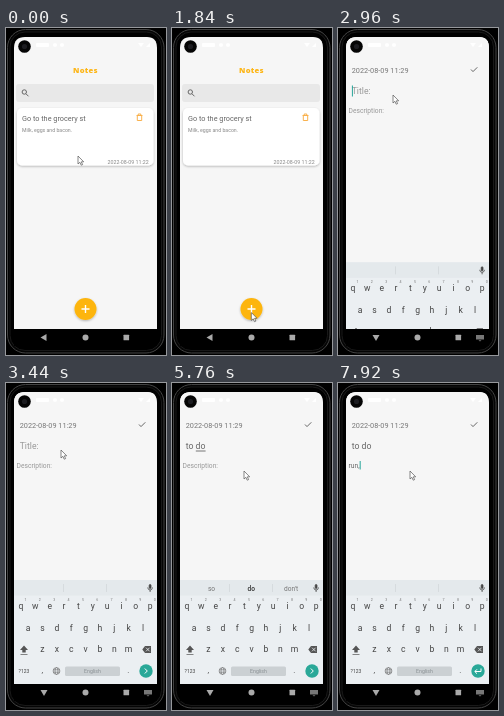
An HTML page that plays this animation: 160 by 327 pixels, repeating every 8000 ms.

```html
<!DOCTYPE html>
<html lang="en">
<head>
<meta charset="utf-8">
<title>Notes app</title>
<style>
  html, body { margin: 0; width: 100%; height: 100%; overflow: hidden; background: #000; }
  svg { display: block; width: 160px; height: 327px; }
  text { font-family: Roboto, sans-serif; fill: #666; white-space: pre; }
  .mid { text-anchor: middle; }
  .line { fill: none; stroke: #666; stroke-width: 1; }
  .hint { fill: #999; }
</style>
</head>
<body>
<svg viewBox="0 0 160 327">
  <defs>
    <clipPath id="screenClip"><path d="M8 301V20Q8 9 19 9H141Q151 9 151 20V301Z"/></clipPath>
    <filter id="shadow" x="-20%" y="-20%" width="140%" height="150%">
      <feDropShadow dx="0" dy="1" stdDeviation="1" flood-opacity=".28"/>
    </filter>
  </defs>

  <rect width="160" height="327"/>
  <rect x="1.5" y="1.5" width="156.5" height="323.5" rx="18" fill="#050505" stroke="#444" stroke-width="1"/>
  <rect x="4" y="4" width="151.5" height="318.5" rx="15" fill="#000" stroke="#191919" stroke-width="1"/>

  <g clip-path="url(#screenClip)">
    <rect x="8" y="9" width="143" height="292" fill="#f6f6f6"/>

    <g id="list">
      <text class="mid" x="79.5" y="45" style="font:800 7.6px 'Open Sans',sans-serif;fill:#fdb515;letter-spacing:.3px">Notes</text>
      <rect x="10" y="56" width="138" height="18" rx="3" fill="#e8e8e8"/>
      <g class="line"><circle cx="18.3" cy="64" r="2.2"/><path d="M20 65.8L22.5 68.3"/></g>
      <rect x="11" y="80" width="136.5" height="57.5" rx="5" fill="#fff" filter="url(#shadow)"/>
      <text x="16" y="93" font-size="7.3">Go to the grocery st</text>
      <text x="16" y="104" font-size="5.2" style="fill:#888">Milk, eggs and bacon.</text>
      <text x="101.5" y="135.5" font-size="5.3" style="fill:#888">2022-08-09 11:22</text>
      <path d="M130.5 87.5H136.5M132.2 87.3V86H134.8V87.3M131.3 88V92.5H135.7V88" fill="none" stroke="#f9aa3c" stroke-width=".9"/>
      <circle cx="79.5" cy="281" r="11" fill="#fdb50d" filter="url(#shadow)"/>
      <circle id="ripple" cx="79.5" cy="281" fill="#fff"/>
      <path d="M75.5 281H83.5M79.5 277V285" stroke="#fff" stroke-width="1.4"/>
    </g>

    <g id="editor">
      <rect x="8" y="9" width="143" height="292" fill="#f6f6f6"/>
      <text x="13.7" y="44.5" font-size="7.3" style="fill:#777">2022-08-09 11:29</text>
      <path class="line" d="M133 41.5L135 43.6L139.3 39.3"/>
      <text id="title" x="13.7" y="66" font-size="8.7"></text>
      <path id="underline" d="M23.8 68H33.6" stroke="#555" stroke-width=".8"/>
      <text id="body" x="10.5" y="85" font-size="6.7"></text>
      <rect id="caret" width="1" fill="#26a69a"/>
    </g>

    <g fill="#fff">
      <rect x="30" y="15" width="13" height="4" rx="1"/>
      <circle cx="49" cy="17" r="2"/><circle cx="56" cy="17" r="2"/>
      <path d="M132 15H138L135 19ZM140 19L144 15V19Z"/>
    </g>

    <g id="keyboard">
      <rect x="8" y="197" width="143" height="104" fill="#ebeff2"/>
      <rect x="8" y="197" width="143" height="15.5" fill="#e4e9ec"/>
      <path d="M57.5 201V209M100.5 201V209" stroke="#d0d6d9" stroke-width=".7"/>
      <g id="words"></g>
      <g fill="none" stroke="#444" stroke-width=".8">
        <rect x="143.2" y="201.5" width="1.8" height="4" rx=".9" fill="#444"/>
        <path d="M141.7 204.5Q142 207 144.1 207T146.5 204.5M144.1 207V209"/>
      </g>
      <g id="keys"></g>
      <path d="M18 262.5L14 267H16.3V269.5H19.7V267H22Z" fill="#555"/>
      <path d="M14.5 271.5H21.5" stroke="#555" stroke-width=".7"/>
      <path d="M136.3 266.5L139 263H145V270H139Z" fill="#555"/>
      <path d="M140 264.7L143.6 268.3M143.6 264.7L140 268.3" stroke="#ebeff2" stroke-width=".8"/>
      <g class="line" style="stroke-width:.6">
        <circle cx="50.5" cy="288" r="3.4"/><ellipse cx="50.5" cy="288" rx="1.5" ry="3.4"/><path d="M47.2 286.8H53.8M47.2 289.2H53.8"/>
      </g>
      <rect x="59" y="283.5" width="55" height="9.5" rx="1.5" fill="#cbd0d3"/>
      <text class="mid" x="86.5" y="290" font-size="5.2" style="fill:#8a9094">English</text>
      <circle cx="140" cy="288" r="6.7" fill="#2aa898"/>
      <path id="enter" fill="none" stroke="#fff" stroke-width="1"/>
    </g>
  </g>

  <rect x="8" y="301" width="143" height="17" fill="#000"/>
  <g fill="#aaa">
    <path id="back" d="M34.5 309.5L40.5 306V313Z"/>
    <circle cx="79.5" cy="309.5" r="3"/>
    <rect x="117.5" y="306.7" width="5.6" height="5.6" rx=".5"/>
    <path id="switcher" d="M138 307H146V311.5H138ZM140.5 312.2H143.5L142 313.6Z" fill="#777"/>
  </g>
  <circle cx="18.5" cy="18.5" r="6.3" fill="#050505"/>
  <circle cx="18.5" cy="18.5" r="2.6" fill="#1c1c20"/>
  <path id="pointer" d="M0 0V8L1.9 6.3L3.2 9.2L4.6 8.6L3.3 5.8H5.7Z" fill="#fff" stroke="#555" stroke-width=".7"/>
</svg>

<script>
const LOOP = 8000, OPEN = 1840, FOCUS_TITLE = 2880, FOCUS_BODY = 6000;
const $ = id => document.getElementById(id);
const clamp = v => Math.min(1, Math.max(0, v));
const progress = (t, start, length) => clamp((t - start) / length);
const smooth = p => p * p * (3 - 2 * p);
const show = (id, on) => $(id).setAttribute("visibility", on ? "visible" : "hidden");
const label = (x, y, size, text, color = "#444") =>
  `<text class="mid" x="${x}" y="${y}" font-size="${size}" style="fill:${color}">${text}</text>`;

// time, x, y of the pointer tip
const path = [
  [0, 72, 128], [240, 72, 136], [880, 78, 284], [1280, 78.5, 288], [1760, 78.5, 288],
  [2080, 83.5, 266], [2720, 55, 67], [5040, 55, 67], [5760, 72, 88], [LOOP, 72, 88]
];
// time, text, suggestions
const titleTyping = [
  [FOCUS_TITLE, ""], [3680, "t", ["the", "to", "that"]], [3920, "to", ["too", "to", "today"]],
  [4240, "to "], [4560, "to d", ["do", "d", "day"]], [4800, "to do", ["so", "do", "don't"]]
];
const bodyTyping = [
  [FOCUS_BODY, ""], [6960, "r", ["are", "r", "right"]], [7200, "ru", ["run", "ru", "rule"]],
  [7440, "run", ["fun", "run", "running"]], [7760, "run,"]
];

[["qwertyuiop", 15, 226], ["asdfghjkl", 22.2, 247.5], ["zxcvbnm", 36.5, 269]].forEach(([row, x, y], r) => {
  [...row].forEach((key, i) => {
    const cx = x + i * 14.35;
    $("keys").innerHTML += label(cx, y, 8.6, key);
    if (!r) $("keys").innerHTML += label(cx + 4.5, 218, 3.6, (i + 1) % 10, "#777");
  });
});
$("keys").innerHTML += label(18, 290, 5, "?123") + label(36.3, 290, 8, ",") + label(122.3, 290, 8, ".");

function pointerAt(t) {
  const i = Math.max(1, path.findIndex(point => point[0] >= t));
  const [t0, x0, y0] = path[i - 1], [t1, x1, y1] = path[i];
  const p = smooth(progress(t, t0, t1 - t0));
  return [x0 + (x1 - x0) * p, y0 + (y1 - y0) * p];
}

const typedAt = (steps, t) => steps.filter(step => step[0] <= t).pop() || [0, ""];

function setField(id, text, hint) {
  $(id).textContent = text || hint;
  $(id).setAttribute("class", text ? "" : "hint");
}

function draw(t) {
  const inBody = t >= FOCUS_BODY, keyboardOpen = t >= FOCUS_TITLE;
  const title = typedAt(titleTyping, t), body = typedAt(bodyTyping, t);
  const [editTime, text, words = []] = inBody ? body : title;

  $("pointer").setAttribute("transform", `translate(${pointerAt(t)})`);
  const tap = progress(t, 1440, 360);
  $("ripple").setAttribute("r", 11 * tap);
  $("ripple").setAttribute("opacity", .35 * Math.sin(Math.PI * tap));
  $("editor").setAttribute("opacity", progress(t, OPEN, 200));

  setField("title", title[1], "Title:");
  setField("body", body[1], "Description:");
  show("underline", title[1] === "to do" && !inBody);

  const field = $(inBody ? "body" : "title");
  const width = text ? field.getSubStringLength(0, text.length) : 0;
  const caret = $("caret");
  caret.setAttribute("x", +field.getAttribute("x") + width + .2);
  caret.setAttribute("y", inBody ? 78 : 57.5);
  caret.setAttribute("height", inBody ? 8.5 : 11);
  show("caret", keyboardOpen && (t - editTime) % 1000 < 500);

  const slide = 1 - (1 - progress(t, FOCUS_TITLE, 280)) ** 3;
  $("keyboard").setAttribute("transform", `translate(0 ${104 * (1 - slide)})`);
  show("keyboard", keyboardOpen);
  $("words").innerHTML = words.map((word, i) =>
    label(39.5 + i * 39.8, 207.5, 6.6, i === 1 ? `<tspan font-weight="500">${word}</tspan>` : word, i === 1 ? "#333" : "#777")
  ).join("");
  $("enter").setAttribute("d", inBody
    ? "M143 285.5V288.5H137M139 286.3L136.8 288.5L139 290.7"
    : "M138.8 285.5L141.3 288L138.8 290.5");
  $("back").setAttribute("transform", keyboardOpen ? "rotate(-90 38 309.5)" : "");
  show("switcher", keyboardOpen);
}

function tick() {
  draw(performance.now() % LOOP);
  requestAnimationFrame(tick);
}
tick();
</script>
</body>
</html>
```
